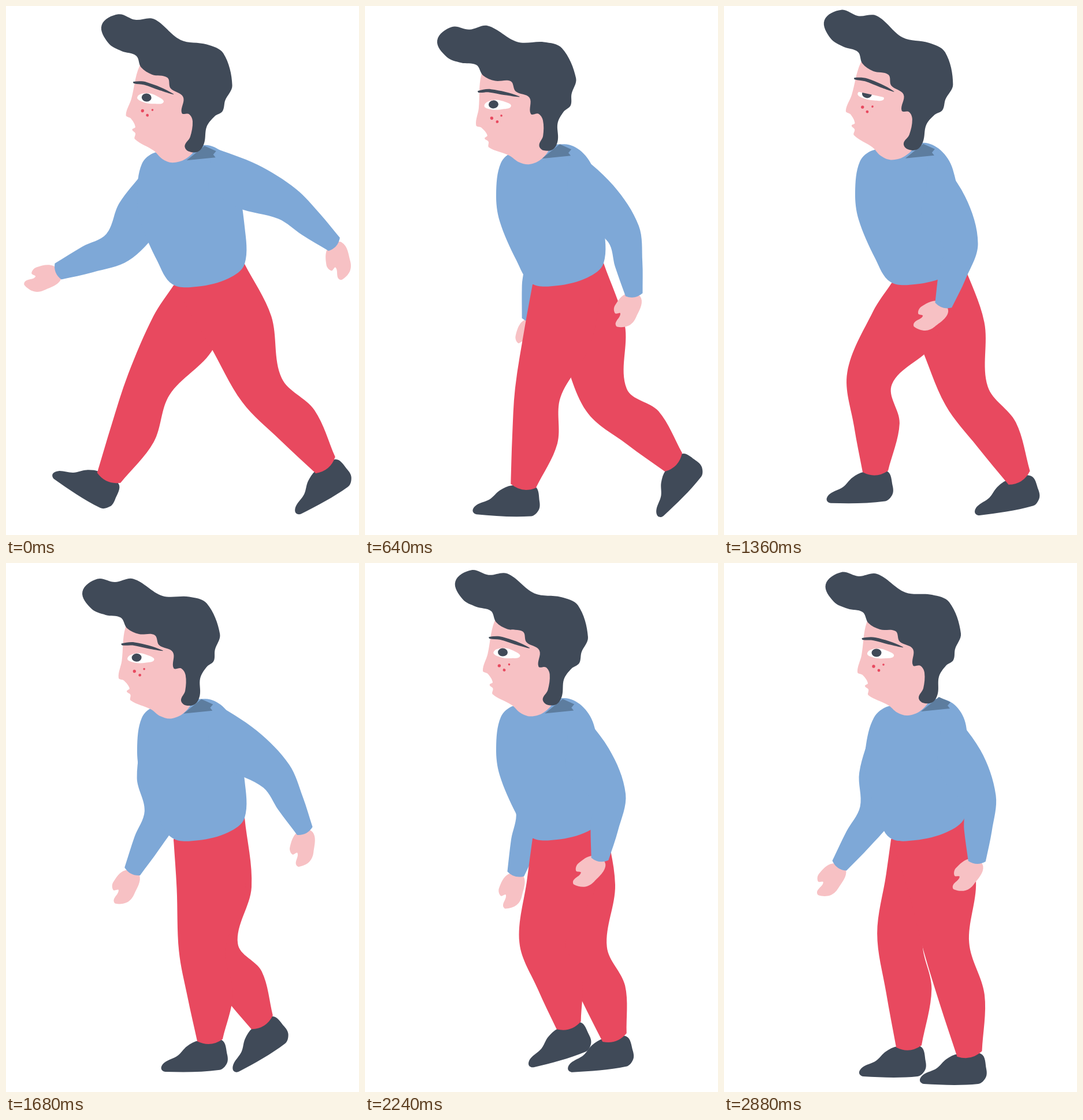
An HTML page with a canvas for the animation above (8 s loop, 611 by 916 pixels).

```html
<!DOCTYPE html>
<html lang="en">
<head>
<meta charset="utf-8">
<title>Walking man</title>
<style>
  html, body { margin: 0; height: 100%; overflow: hidden; background: #fff; }
  canvas { display: block; }
</style>
</head>
<body>
<canvas width="611" height="916"></canvas>
<script>
const c = document.querySelector('canvas').getContext('2d');
const BLUE = '#7ea8d7', RED = '#e8495f', SKIN = '#f7c1c4', DARK = '#404a58', SHADE = '#5d7d9f';
const STEP = 80, CYCLE = 12, STAND = 36, LOOP = 8000;
const RAD = Math.PI / 180;

// One leg through the cycle: knee x, y, ankle x, y, foot angle.
const stride = {
  0: [247, 656, 178, 817, 32],
  1: [261, 662, 210, 828, 2],
  2: [299, 670, 274, 831, 2],
  5: [420, 675, 511, 817, -10],
  6: [443, 665, 553, 795, -30],
  7: [436, 668, 559, 787, -36],
  8: [418, 682, 534, 790, -46],
  11: [252, 645, 262, 806, -2],
};

const standing = {
  legs: [[305, 645, 320, 837, 0], [385, 665, 425, 850, 0]],
  near: [63, 92],
  far: [100, 125],
  head: [354, 241, 0],
  lean: .12,
  lift: -4,
};

// Half widths at mid-upper, joint, mid-lower and end of a limb.
const SLEEVE = [41, 30, 24, 15], LEG_BACK = [68, 40, 47, 22], LEG_FRONT = [50, 40, 32, 22];

// Outlines by a few points each; shoe and hand hang from (0, 0).
const torso = [258,252, 235,272, 227,325, 233,372, 262,440, 288,480, 332,484, 385,470, 413,445,
  413,380, 396,285, 375,252, 345,239];
const shoe = [-20,0, -40,9, -57,25, -80,36, -86,46, -79,52, 15,52, 28,41, 29,26, 20,0];
const hand = [-12,-4, -36,13, -38,26, -29,28, -40,43, -38,50, -18,51, -4,40, 11,8];
const shadow = [-13,16, 18,-9, 38,0, 33,6, 37,11];

// The head is drawn around the nape at (354, 241).
const face = [262,90, 247,103, 238,160, 231,189, 240,194, 249,208, 244,213, 250,219, 250,229,
  284,246, 300,259, 318,264, 340,256, 356,235, 356,185, 330,110];
const hair = [240,85, 250,104, 270,115, 297,118, 304,136, 327,149, 327,177, 340,178, 347,190, 345,217,
  337,233, 344,242, 361,241, 370,226, 372,197, 384,178, 397,168, 400,149, 410,122, 390,68, 360,55,
  314,51, 265,19, 233,23, 203,16, 176,37, 190,67, 214,79];
const brow = [239,130, 262,129, 309,145, 285,141, 258,134, 240,133];
const eye = [248,156, 265,148, 285,153, 294,161, 280,165, 260,164];

const pairs = nums => nums.flatMap((x, i) => i % 2 ? [] : [[x, nums[i + 1]]]);
const mix = (a, b, t) => a.map((v, i) => v + (b[i] - v) * t);
const gap = (p, q) => Math.hypot(q[0] - p[0], q[1] - p[1]);
const polar = ([x, y], angle, r) => [x + r * Math.cos(angle * RAD), y + r * Math.sin(angle * RAD)];

// Continues the path smoothly through the points.
function spline(points, closed) {
  const n = points.length;
  const at = i => points[closed ? (i + n) % n : Math.max(0, Math.min(n - 1, i))];
  c.lineTo(...points[0]);
  for (let i = 0; i < (closed ? n : n - 1); i++) {
    const p = at(i - 1), q = at(i), r = at(i + 1), s = at(i + 2);
    const len = gap(q, r) / 3, u = len / gap(p, r), v = len / gap(q, s);
    c.bezierCurveTo(q[0] + (r[0] - p[0]) * u, q[1] + (r[1] - p[1]) * u,
      r[0] - (s[0] - q[0]) * v, r[1] - (s[1] - q[1]) * v, ...r);
  }
}

function fill(color, trace) {
  c.fillStyle = color;
  c.beginPath();
  trace();
  c.fill();
}

const blob = (color, points) => fill(color, () => spline(points, true));
const shape = (color, nums) => blob(color, pairs(nums));
const polygon = (color, nums) => fill(color, () => pairs(nums).forEach(p => c.lineTo(...p)));
const oval = (color, x, y, rx, ry = rx) => fill(color, () => c.ellipse(x, y, rx, ry, 0, 0, 7));

function placed([x, y], angle, draw) {
  c.save();
  c.translate(x, y);
  c.rotate(angle * RAD);
  draw();
  c.restore();
}

// A tapering limb: right and left edges grow from two root points and meet in a rounded hem.
function limb(color, [top, joint, end], roots, rightWidths, leftWidths) {
  const chain = [top, mix(top, joint, .5), joint, mix(joint, end, .5), end];
  const angle = i => {
    const a = chain[i - 1], b = chain[i + 1] || end;
    return Math.atan2(b[1] - a[1], b[0] - a[0]) / RAD;
  };
  const edge = (root, widths, turn) => [root, ...widths.map((w, i) => polar(chain[i + 1], angle(i + 1) + turn, w))];
  const right = edge(roots[0], rightWidths, -90);
  const left = edge(roots[1], leftWidths, 90).reverse();
  fill(color, () => {
    spline(right);
    c.quadraticCurveTo(...polar(end, angle(4), rightWidths[3] * .6), ...left[0]);
    spline(left);
  });
}

function arm(shoulder, [upper, fore], lengths, roots, handTurn) {
  const elbow = polar(shoulder, upper, lengths[0]);
  const wrist = polar(elbow, fore, lengths[1]);
  placed(wrist, fore + handTurn, () => shape(SKIN, hand));
  limb(BLUE, [shoulder, elbow, wrist], roots.map(([x, y]) => [shoulder[0] + x, shoulder[1] + y]), SLEEVE, SLEEVE);
}

function strideAt(k) {
  const key = i => stride[(i + CYCLE) % CYCLE];
  k %= CYCLE;
  let a = k, b = k + 1;
  while (!key(a)) a--;
  while (!key(b)) b++;
  return mix(key(a), key(b), (k - a) / (b - a));
}

function walking(k) {
  // Arms swing once per cycle, head and body bob twice.
  const wave = (peak, period) => Math.cos((k - peak) / period * 2 * Math.PI);
  const near = wave(-.6, CYCLE), far = wave(.2, CYCLE);
  const sway = wave(5.2, CYCLE / 2), lift = 4 * wave(.8, CYCLE / 2) - 1;
  return {
    legs: [strideAt(k), strideAt(k + CYCLE / 2)],
    near: [45 - 22 * near, 73 - 34 * near],
    far: [92 + 33 * far, 121 + 37 * far],
    head: [323 + 4 * sway, 249 + lift + sway, 1 + 5.8 * sway],
    lean: 0,
    lift,
    blink: k % CYCLE === 5,
  };
}

function drawHead(blink) {
  c.translate(-354, -241);
  shape(SKIN, face);
  shape(DARK, hair);
  shape(DARK, brow);
  shape('#fff', eye);
  oval(DARK, 264, 155.5, 8.5, 7);
  if (blink) polygon(SKIN, [244,144, 297,146, 297,158, 244,153]);
  oval(RED, 259, 179, 2.7);
  oval(RED, 276, 176, 1.8);
  oval(RED, 268, 186, 2.4);
}

function draw({ legs, near, far, head, lean, lift, blink }) {
  const body = ([x, y]) => [x + lean * (475 - y), y + lift];
  const waist = [body([413, 445]), body([290, 482])];
  const hip = mix(...waist, .5);
  c.clearRect(0, 0, 611, 916);
  arm(body([266, 311]), far, [128, 111], [[30, 10], [-28, -25]], -127);
  for (const [, , x, y, foot] of legs) placed([x, y], foot, () => shape(DARK, shoe));
  for (const [kx, ky, x, y] of legs) limb(RED, [hip, [kx, ky], [x, y]], waist, LEG_BACK, LEG_FRONT);
  blob(BLUE, pairs(torso).map(body));
  arm(body([350, 280]), near, [150, 107], [[5, -38], [0, 36]], -90);
  placed(head, 0, () => polygon(SHADE, shadow));
  placed(head, head[2], () => drawHead(blink));
}

function tick() {
  const k = Math.floor(performance.now() % LOOP / STEP);
  draw(k < STAND ? walking(k) : standing);
  requestAnimationFrame(tick);
}
tick();
</script>
</body>
</html>
```
